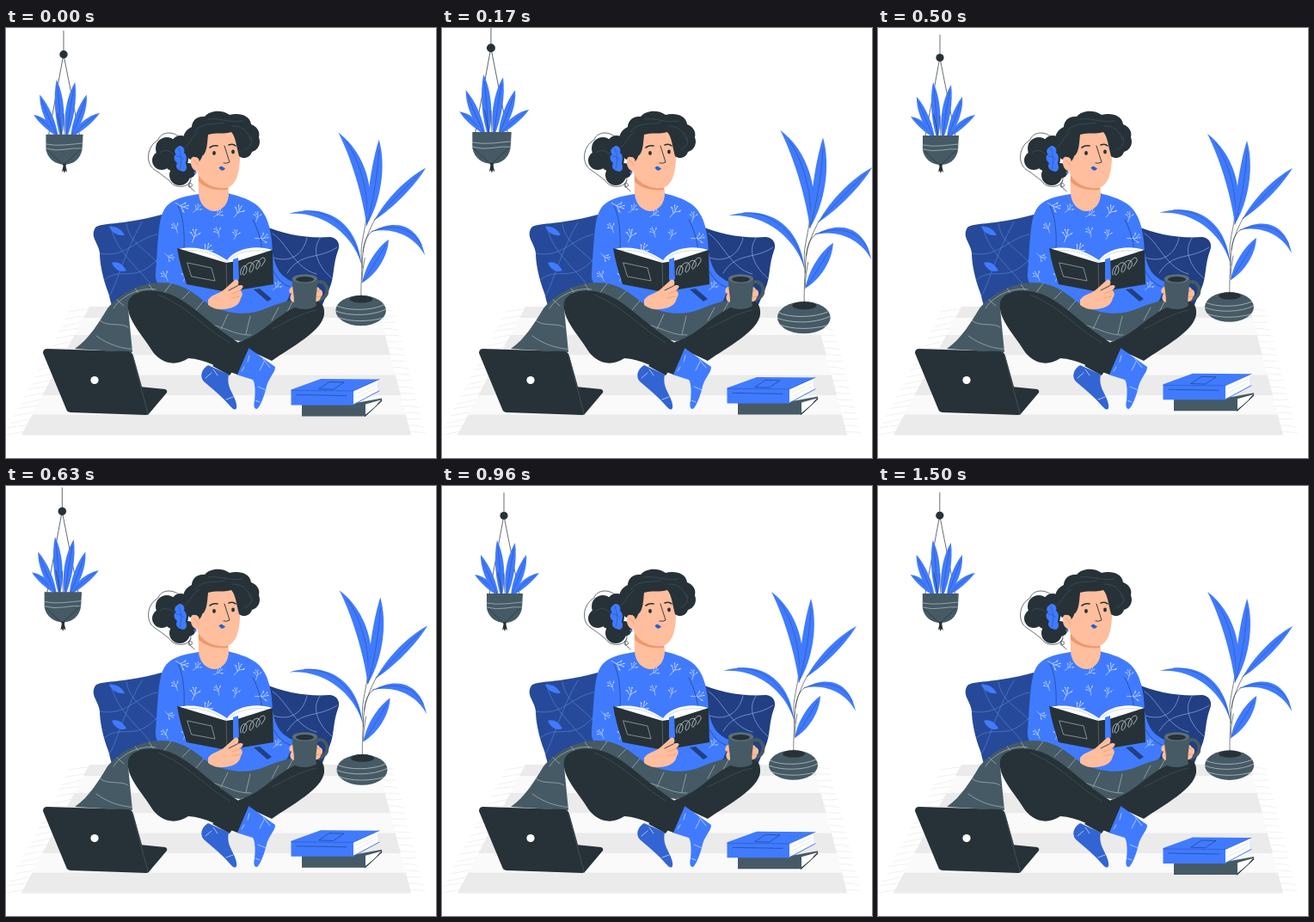
These frames come from a looping animation (500 by 500 pixels, 1540 ms). An HTML page with a canvas:

```html
<!DOCTYPE html>
<html lang="en">
<head>
<meta charset="utf-8">
<title>Reading at home</title>
<style>
html, body { margin: 0; width: 100%; height: 100%; overflow: hidden; background: #fff; }
canvas { display: block; width: 500px; height: 500px; }
</style>
</head>
<body>
<canvas id="stage"></canvas>
<script>
const SIZE = 500, LOOP = 1540, FRAME = LOOP / 37;
const BLUE = '#407bff', DARK = '#263238', SLATE = '#455a64', SKIN = '#ffbe9d', BLUSH = '#eb996e';
const canvas = document.getElementById('stage');
const ctx = canvas.getContext('2d');
const ratio = window.devicePixelRatio || 1;
canvas.width = canvas.height = SIZE * ratio;

function fill(color, d) {
  ctx.fillStyle = color;
  ctx.fill(new Path2D(d));
}
function line(color, d, width = 0.8) {
  ctx.strokeStyle = color;
  ctx.lineWidth = width;
  ctx.stroke(new Path2D(d));
}
function oval(color, x, y, rx, ry = rx) {
  ctx.fillStyle = color;
  ctx.beginPath();
  ctx.ellipse(x, y, rx, ry, 0, 0, Math.PI * 2);
  ctx.fill();
}
function clipped(d, draw) {
  ctx.save();
  ctx.clip(new Path2D(d));
  draw();
  ctx.restore();
}

// Piecewise linear value through [position, value] stops.
function between(stops, p) {
  const i = stops.findIndex(s => s[0] >= p);
  if (i <= 0) return stops[0][1];
  const [p0, v0] = stops[i - 1], [p1, v1] = stops[i];
  return v0 + (v1 - v0) * (p - p0) / (p1 - p0);
}
const BEAT = [[0, 1], [0.1, 1.1], [0.3, 1], [0.4, 1], [0.5, 1.1], [0.6, 1], [1, 1]];
const FLOAT = [[0, 0], [0.5, -9.5], [1, 0]];

function drawRug() {
  const left = y => 97 - (y - 324) * 0.53;
  const right = y => 432 + (y - 324) * 0.262;
  const edges = [324, 337, 357, 380.5, 403.5, 427, 449.5, 473.5];
  edges.slice(1).forEach((bottom, i) => {
    const top = edges[i];
    fill(i % 2 ? '#fafafa' : '#ebebeb',
      `M${left(top)},${top}L${right(top)},${top}L${right(bottom)},${bottom}L${left(bottom)},${bottom}Z`);
  });
  for (let i = 0; i < 20; i++) {
    const y = 327 + i * 7.5, sag = i % 3 - 1;
    line('#e6e6e6', `M${left(y)},${y}q-12,${2 + sag} -22,${4 + sag}`, 0.6);
    line('#e6e6e6', `M${right(y)},${y}q8,${sag} 17,${1 - sag}`, 0.6);
  }
}

function drawPillows() {
  const leftShape = 'M104,232C110,226 132,230 181,217L206,240L200,325L127,325C122,325 122,318 119,308C112,290 109,272 109,262C108,250 97,243 104,232Z';
  fill('#264a99', leftShape);
  clipped(leftShape, () => {
    line('#5c86df', 'M140,228C145,255 165,255 183,282M109,262C140,268 150,245 176,240M112,295C134,274 148,300 177,268M122,230C126,260 160,284 178,310M120,312C128,300 138,260 158,226', 0.6);
    fill(BLUE, 'M120,231C127,230 135,234 138,241C130,242 123,238 120,231ZM123,273C130,270 137,276 140,282C132,285 126,280 123,273Z');
  });
  const rightShape = 'M300,230C324,240 350,245 377,243C386,244 389,252 386,259C380,274 382,290 376,303L367,324L305,324Z';
  fill('#213f82', rightShape);
  clipped(rightShape, () =>
    line('#8ca9ea', 'M310,239C327,250 336,280 361,286M311,267C335,275 347,258 350,244M327,285C342,260 363,270 385,255M366,243C351,262 370,284 379,291', 0.7));
}

function sprig(x, y, turn, size) {
  ctx.save();
  ctx.translate(x, y);
  ctx.rotate(turn);
  ctx.scale(size, size);
  line('#dfe9ff', 'M0,10Q2,0 0,-8M1,3L-5,-2M1,1L6,-4M0,-2L-4,-7M-5,-2l-2,0M6,-4l1,-2', 0.75);
  for (const [px, py] of [[0, -8], [-5, -2], [6, -4], [-4, -7]]) oval('#dfe9ff', px, py, 0.8);
  ctx.restore();
}

function drawSweater() {
  const shape = 'M224,193C205,196 190,200 184,211C177,223 177,247 174,285C173,296 178,302 190,305L235,338L298,338L327,317L336,296C322,291 313,282 310,260C309,235 304,214 289,204C280,198 269,195 258,192Z';
  fill(BLUE, shape);
  clipped(shape, () => {
    [[205, 207, 2], [222, 210, 0.8], [247, 216, 1], [270, 213, 0.6], [292, 219, 0.2],
      [197, 232, -0.4], [219, 241, 0.3], [246, 237, -0.3], [267, 240, 0.3], [298, 244, 1.5],
      [190, 266, 2.2], [208, 288, 0.2], [233, 257, 0.9], [185, 288, -0.5],
      [315, 300, 0.8]].forEach(([x, y, turn], i) => sprig(x, y, turn, i % 3 ? 0.65 : 0.85));
  });
  line('#244990', 'M200,207C206,218 208,238 207,258M287,223C293,234 297,248 298,260M311,283C317,294 324,299 330,301');
  fill('#213f82', 'M288,304L295,303L309,315L304,318Z');
}

function drawHead() {
  for (const [x, y, r] of [[187, 140, 13], [181, 154, 11], [197, 152, 15], [203, 136, 11], [202, 171, 12], [212, 166, 9]]) oval(DARK, x, y, r);
  line(DARK, 'M202,127C193,119 180,121 177,130C163,138 162,158 173,165C182,171 190,177 193,181C200,187 215,185 215,175', 0.7);
  line(DARK, 'M215,178C210,183 212,187 216,184C218,181 213,179 213,182C214,188 218,187 219,190', 0.7);

  fill(SKIN, 'M223,151L224,193C225,206 234,213 243,213C252,212 259,204 259,192L258,180Z');
  fill(BLUSH, 'M224,172C233,180 244,185 258,183L258,188C244,190 229,185 224,178Z');
  fill(SKIN, 'M223,137C224,121 240,115 264,117C270,124 272,140 272,153C271,170 268,182 257,186C240,188 225,178 223,167C213,165 212,149 222,150Z');
  fill(DARK, 'M224,164C220,158 228,153 228,149C234,145 234,133 235,124C243,121 254,124 262,121C267,126 268,138 271,149C276,153 284,151 286,144C293,142 297,135 294,127C296,120 291,114 285,112C284,101 270,98 260,101C251,94 236,96 231,103C220,102 216,110 216,115C207,119 205,127 206,135C200,143 207,150 212,151C214,155 218,151 222,150Z');
  fill(SKIN, 'M224,152C215,146 213,153 217,160C220,166 226,165 226,160Z');
  line(BLUSH, 'M218,154Q222,155 223,160', 0.7);
  line(SLATE, 'M219,121C228,108 244,113 254,110M235,106C249,104 260,111 275,108M263,114C276,114 282,121 284,130M208,139C214,134 216,126 224,121M278,141C285,139 287,132 285,127M179,145C187,139 195,145 198,151', 0.6);

  fill(BLUE, 'M199,139C203,134 209,140 207,145C212,149 209,155 209,158C212,164 208,169 203,166C198,165 197,160 199,157C194,153 195,148 198,147C195,145 196,140 199,139Z');
  line('#2656bd', 'M201,140Q206,152 202,164M198,149Q204,149 207,153', 0.7);
  oval(BLUE, 220, 168, 1.6);

  oval(DARK, 242, 145.5, 1.9, 2.4);
  oval(DARK, 264, 144, 1.9, 2.4);
  line(DARK, 'M237,139Q241,136 246,137M259,136Q264,134 267,137', 1.6);
  line(DARK, 'M254,137L260,156Q257,158 253,157', 0.9);
  fill('#2860cb', 'M247.5,162.5Q250,159.5 252,161.5L255,163.5Q252,167 249.5,165Z');
}

function drawLegs() {
  const blanket = 'M80,373C97,361 107,344 118,326C134,307 159,296 180,296C206,296 219,309 235,321C255,333 282,335 300,327C324,317 342,313 365,316L365,326C324,328 307,361 272,364L239,358L160,322L142,326L147,377Z';
  fill(SLATE, blanket);
  clipped(blanket, () =>
    line('#abb6bc', 'M125,326C135,310 158,301 174,304M109,340C118,348 134,342 142,348M105,358C121,370 138,373 152,374M165,296L171,305M192,297L183,309M215,305L205,315M230,317L220,329M258,333L250,350M284,335L279,356M317,325L309,340M334,317L327,330M149,301L155,310M128,315L137,323M232,344C251,345 265,358 285,357', 0.7));
  fill(DARK, 'M271,365C302,356 318,327 350,320C365,314 371,321 370,333C368,352 332,371 309,387L281,374L260,404L240,393Z');
  fill('#3265d3', 'M235,392C227,397 225,405 230,411C239,419 251,428 261,440C267,447 270,443 267,434C264,424 256,417 259,403Z');
  fill(BLUE, 'M282,372L313,394C313,402 304,407 302,421C299,431 296,438 293,442C290,445 287,441 289,433C290,425 290,413 287,409L268,403Z');
  fill(DARK, 'M142,319C145,306 168,302 189,309C217,319 237,347 282,373L269,403C252,397 231,385 212,384C194,396 177,387 169,374C159,357 139,338 142,319Z');
  line('#475960', 'M177,310C213,325 231,349 260,366M309,350C328,341 344,331 361,328', 0.6);
  line('#d9e5ff', 'M283,381L281,388M300,388L295,398M277,394L274,399M293,417C297,419 301,420 302,421M290,433L295,435M232,407L239,401M256,432L264,429M241,397L246,404M299,385L307,395', 0.7);
}

function drawReading() {
  fill('#fff', 'M201,257C222,252 243,260 257,270C267,256 291,252 309,258L308,264L257,284L204,270Z');
  line('#bac4c9', 'M205,259C225,256 243,263 256,272C268,261 287,256 306,260', 0.6);
  fill(DARK, 'M199,256L256,273L269,271L310,258L311,298L257,307L210,298C205,283 201,269 199,256Z');
  line('#657279', 'M256,273L257,307', 0.7);
  line('#c3cace', 'M211,273L239,279L243,294L216,289Z', 0.6);
  line('#e4e8ea', 'M273,287C271,277 280,273 280,280C280,288 273,290 276,282C280,270 289,271 288,278C286,286 281,286 284,278C289,267 297,269 295,276C292,283 289,281 292,274C296,266 302,265 301,271L297,277', 0.7);
  fill(BLUE, 'M264,269L270,267L271,292L267,296L264,293Z');
  fill(SKIN, 'M235,316C240,309 249,309 255,303L266,293C270,291 272,296 269,300C276,297 278,301 272,305C276,307 275,312 273,314C272,322 263,327 252,327C245,328 239,325 235,322Z');
  line(DARK, 'M259,305L269,300', 0.9);
  line(BLUSH, 'M263,309L273,305M262,314L272,312', 0.7);
}

function drawMug() {
  fill(SKIN, 'M335,300C328,302 328,308 332,309C328,315 332,321 341,319L341,298Z');
  ctx.strokeStyle = SLATE;
  ctx.lineWidth = 4;
  ctx.beginPath();
  ctx.ellipse(365, 305, 8.5, 10, 0, 0, Math.PI * 2);
  ctx.stroke();
  fill(SKIN, 'M354,308C357,300 363,299 365,304C369,305 369,311 366,313C365,319 359,319 354,317Z');
  line(BLUSH, 'M358,307L365,305M358,313L366,312M331,309L336,307', 0.7);
  fill(SLATE, 'M333,290L362,290C363,303 359,313 361,323C355,328 341,328 334,324C337,314 332,304 333,290Z');
  oval('#5c6f78', 347.5, 291.5, 14.5, 5.2);
  oval(DARK, 347.5, 292.3, 10.5, 3.2);
}

function drawLaptop() {
  fill(DARK, 'M155,417L185,420Q188,421 187,424L165,450Z');
  fill(DARK, 'M48,373L142,376Q146,376 148,381L166,446Q166,450 163,450L76,447Q71,447 70,443L43,378Q43,373 48,373Z');
  line('#53636a', 'M147,380L165,448', 0.6);
  oval('#fff', 103, 409.5, 4.6);
}

// A leaf from root to tip; bend moves its middle sideways.
function leaf(x0, y0, x1, y1, width, bend = 0) {
  const dx = x1 - x0, dy = y1 - y0, len = Math.hypot(dx, dy);
  const nx = -dy / len, ny = dx / len;
  const at = (along, side) => `${x0 + dx * along + nx * side},${y0 + dy * along + ny * side}`;
  fill(BLUE, `M${x0},${y0}C${at(0.3, bend - width)} ${at(0.72, bend - width)} ${x1},${y1}C${at(0.72, bend + width)} ${at(0.3, bend + width)} ${x0},${y0}Z`);
  line('#234b96', `M${x0},${y0}C${at(0.3, bend)} ${at(0.65, bend)} ${at(0.88, bend * 0.42)}`, 0.5);
}

function drawHangingPlant() {
  line(DARK, 'M72,8L72,34L55,126M72,35L90,126', 0.7);
  oval(DARK, 72, 34.5, 4.6);
  leaf(66, 128, 38, 103, 5, 2);
  leaf(66, 129, 45, 80, 6, -1);
  leaf(81, 128, 113, 101, 5, -2);
  leaf(80, 129, 98, 80, 6, 1);
  leaf(69, 130, 64, 63, 6.5, 1);
  leaf(75, 130, 85, 66, 6.5, -1);
  line(DARK, 'M72,102L73,126M65,101L70,126', 0.6);
  fill(SLATE, 'M52,125L94,125L93,142C91,153 83,159 73,159C63,159 54,153 52,142Z');
  line('#b8c1c6', 'M52,136Q62,138 73,137T94,135M52,141Q63,144 74,142T93,141', 0.7);
  line(DARK, 'M54,143L72,160L91,142', 0.6);
  fill(DARK, 'M71,158L75,158L74.5,161L76,168L74,166L73,169L71.5,166L70,168L71.5,161Z');
}

function drawFloorPlant() {
  line(DARK, 'M409,313C408,293 411,270 409,263C408,248 414,232 415,216M410,276C410,256 412,245 425,220M410,291Q410,280 413,265M411,258Q412,241 422,234', 0.6);
  leaf(415, 228, 383, 123, 8.5, 14);
  leaf(415, 228, 429, 131, 8.5, 4);
  leaf(424, 222, 482, 163, 6.5, -1);
  leaf(409, 271, 327, 215, 6, 29);
  leaf(421, 235, 481, 262, 6, -21);
  leaf(410, 293, 440, 244, 8, 1);
  oval(SLATE, 408.5, 324.5, 28.5, 17.2);
  oval(DARK, 409, 311.5, 13, 4.2);
  line('#c5cdd0', 'M381,319C393,325 420,325 435,318M380,325C395,331 421,331 437,323M382,332C398,338 418,337 433,333', 0.7);
  line(DARK, 'M409,307L409,312', 0.6);
}

function drawBooks() {
  fill(SLATE, 'M344,437L404,437L437,431L437,434L418,452L344,452Z');
  fill('#fff', 'M418,438L436,433Q430,439 431,440L418,450Z');
  line(DARK, 'M417.5,452L437,434', 1);
  fill('#fff', 'M404,422L433,410Q430,416 433,422L404,438Z');
  fill(BLUE, 'M331.5,421L366,408.5L434,409L404,422.5L404,439L331.5,439Z');
  line('#2857b9', 'M332,422L404,422.5L434,409', 0.6);
  line(BLUE, 'M404,438.5L434,422.5', 1);
  line('#cdd3d6', 'M407,426L430,415M407,431L430,419', 0.5);
  line('#1f458f', 'M364,420L376,412L393,412.5L381,420.5ZM338,427L396,428', 0.7);
}

function drawRoom(now) {
  const p = ((now + FRAME) % LOOP) / LOOP;
  const beat = between(BEAT, p);
  ctx.setTransform(ratio, 0, 0, ratio, 0, 0);
  ctx.fillStyle = '#fff';
  ctx.fillRect(0, 0, SIZE, SIZE);
  drawRug();
  drawPillows();
  drawSweater();
  drawHead();
  drawLegs();
  drawReading();
  drawMug();
  drawLaptop();

  ctx.save();
  ctx.translate(257, 174);
  ctx.scale(beat, beat);
  ctx.translate(-257, -174);
  drawHangingPlant();
  drawFloorPlant();
  ctx.restore();

  ctx.save();
  ctx.translate(0, between(FLOAT, p));
  drawBooks();
  ctx.restore();
}

let start;
function tick(now) {
  start ??= now;
  drawRoom(now - start);
  requestAnimationFrame(tick);
}
ctx.lineCap = ctx.lineJoin = 'round';
drawRoom(0);
requestAnimationFrame(tick);
</script>
</body>
</html>
```
